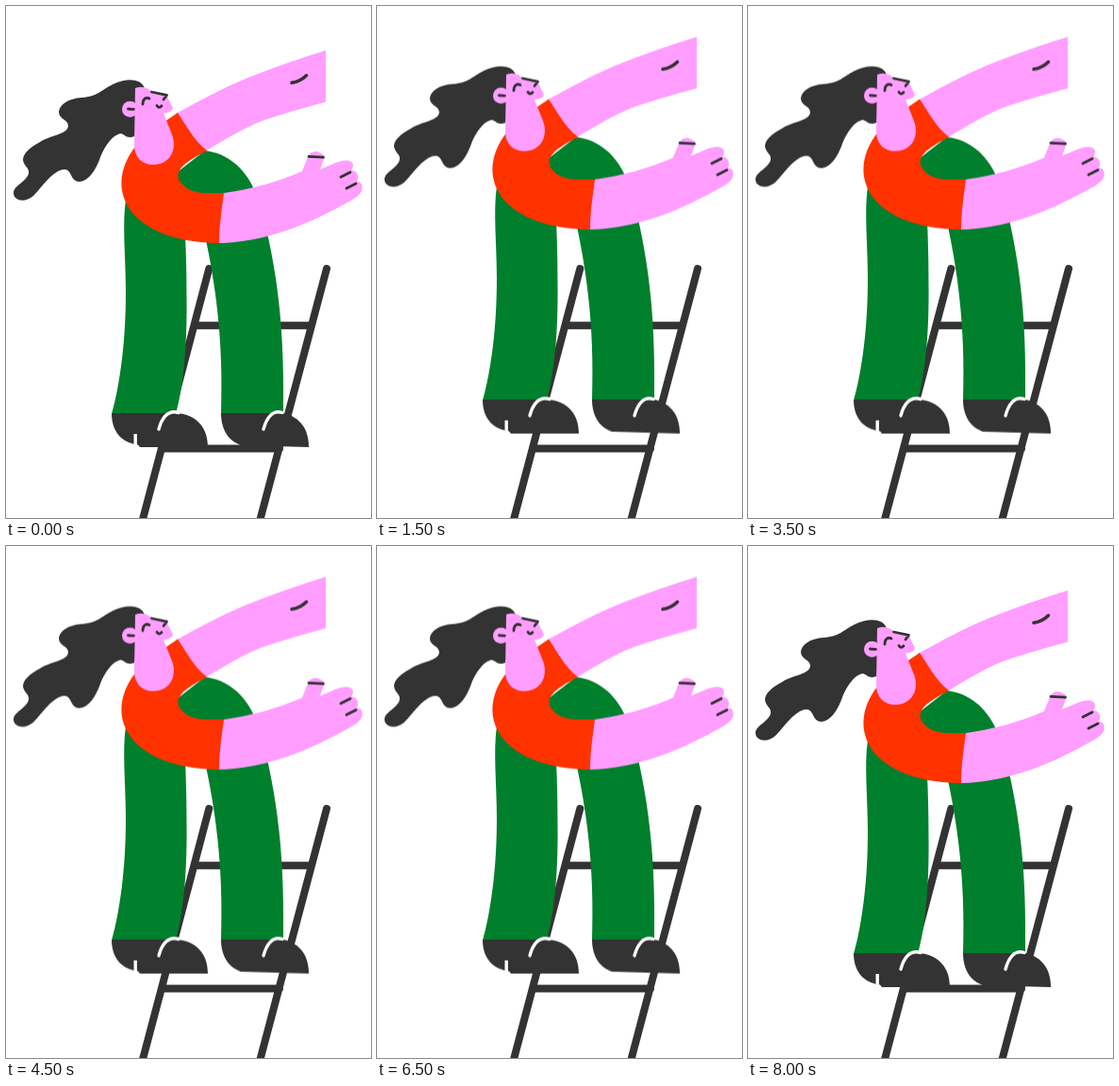
Animation, 387 px wide and 542 px high, one loop 8500 ms. Source, as an HTML page:

```html
<!DOCTYPE html>
<html lang="en">
<head>
<meta charset="utf-8">
<title>Bouncing on a ladder</title>
<style>
  html, body { margin: 0; width: 100%; height: 100%; overflow: hidden; background: #fff; }
  svg { display: block; width: 387px; height: 542px; }
  .ink { fill: #333; }
  .skin { fill: #ff9eff; }
  .top { fill: #ff3200; }
  .pants { fill: #007f2c; }
  .line { fill: none; stroke: #333; stroke-width: 2.8; stroke-linecap: round; stroke-linejoin: round; }
  .ladder { fill: none; stroke: #333; stroke-width: 8; stroke-linecap: round; }
  .lace { fill: none; stroke: #fff; stroke-width: 3.4; stroke-linecap: round; }
</style>
</head>
<body>
<svg viewBox="0 0 387 542">
  <path class="ladder" d="M215.3 278 L143 551 M340 278 L267.5 551 M204 338.3 H322 M165 468.5 H290"/>

  <g id="woman">
    <!-- legs and hips -->
    <path class="pants" d="M127 205 C123 232 127 266 127 303 C127 355 121 400 112 432 H180 C189 400 192 355 191.500 310 C191.500 285 191 265 190 242 L160 205 Z"/>
    <path class="pants" d="M211 243 C221 290 231 350 228 432 H294 C295 365 292 305 276 236 Z"/>
    <path class="pants" d="M211 153 C234 156 252 170 263 194 L232 205 H195 L175 181 Z"/>

    <!-- shoes -->
    <path class="ink" d="M112 431 H182 C202 433 214 446 214 467 H142 L140 464.500 C121 462 112 449 112 431 Z"/>
    <path class="ink" d="M228 431 H294 C312 435 321 448 321 467 L250 465 C235 461 228 447 228 431 Z"/>
    <path class="lace" d="M162 448 C165 437 171 427 183 430.500 M273 448 C276 437 282 427 293 430.500"/>
    <path class="lace" style="stroke-linecap:butt" d="M137.200 453 V465.500"/>

    <!-- hair -->
    <path class="ink" d="M147 87 C143 76 127 76 113 83 C101 89 97 96 80 97 C66 98 57 104 56 112 C56 120 66 120 66 127 C65 136 49 136 36 144 C25 150 18 156 18 163 C19 170 25 171 24 177 C22 186 8 190 8 198 C8 206 20 209 29 201 C39 191 49 174 62 173 C70 173 68 186 78 186 C88 185 95 173 99 163 C104 149 113 136 122 135 C126 136 128 141 136 138 L142 110 Z"/>

    <!-- far arm -->
    <path class="skin" d="M180 114 C208 99 235 84 264 73 Q300 59 339 47 V101.500 Q300 112 273 121 C250 130 231 142 211 154 Z"/>
    <path class="line" style="stroke-width:3.500" d="M303 81.300 Q312 80 318.500 73.500"/>

    <!-- vest -->
    <path class="top" d="M182 113 C191 126 199 142 213 153 C203 159 188 165 183 176 C180 186 192 198 212 198 H233 L228 251 C190 251 155 242 135 220 C117 199 119 172 137 149 L160 128 Z"/>

    <!-- near arm -->
    <path class="skin" d="M231 198 C261 194 288 186 314 175 L320 160 C323 153 330 152 337 158 Q338 160 337 162 L333 173 C341 170 348 166 354 164.500 C360 162.500 367 163 368 168 Q368 172 366 174 C372 174 375 180 372 186 C377 185 379 191 377 196 C374 203 361 208 351 214 C311 235 270 250 226 251 C226 232 229 214 231 198 Z"/>
    <path class="line" d="M321 159.300 L336.500 160.200 M355 181 L365 176 M361 193 L371 188"/>

    <!-- head -->
    <circle class="skin" cx="131.500" cy="109.300" r="8.500"/>
    <path class="skin" d="M137 87 C145 84 151 87 155 91 L170 94 L177 108 Q176 113 167 113.500 L176 136 C182 152 174 168 156 168 C144 168 136 160 136 147 Z"/>
    <path class="line" d="M129.500 109 L135.500 109.300 M145 104 C145 98.500 148.500 96 152 98 M160 105.500 Q162 109 165 105.800 M154.500 91 L170.500 94.300 L167 99"/>
  </g>
</svg>
<script>
  const STEP = 500;
  const COUNT = 17;
  const lift = [0, 14.4, 29, 14.4];

  const frames = Array.from({ length: COUNT + 1 }, (_, i) => ({
    offset: i / COUNT,
    transform: `translateY(${-lift[Math.min(i, COUNT - 1) % lift.length]}px)`,
    easing: 'steps(1, end)'
  }));

  document.getElementById('woman').animate(frames, {
    duration: STEP * COUNT,
    iterations: Infinity
  });
</script>
</body>
</html>
```
